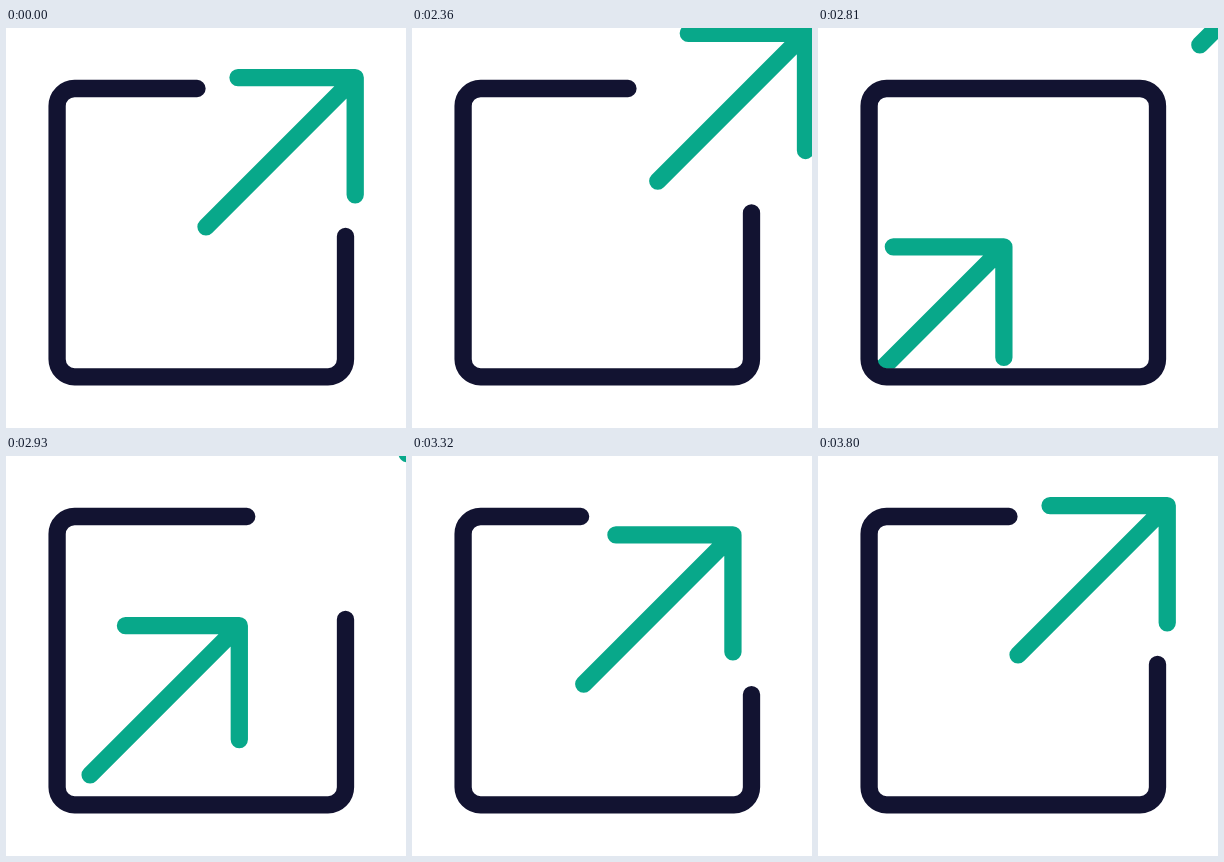
Write an HTML page with a canvas that moves like this. It is 400 by 400 pixels and loops after 3.83 s.

```html
<!DOCTYPE html>
<html lang="en">
<head>
<meta charset="utf-8">
<title>Outgoing arrow</title>
<style>
html, body { margin: 0; width: 100%; height: 100%; overflow: hidden; background: #fff; }
canvas { display: block; width: 400px; height: 400px; }
</style>
</head>
<body>
<canvas id="stage" width="400" height="400"></canvas>
<script>
const ctx = document.getElementById('stage').getContext('2d');
const LOOP = 3830;
const DARK = '#121331', GREEN = '#08a88a';
const BOX = { left: 51.1, top: 60.5, right: 339.5, bottom: 348.8, r: 17.5 };
const ARM = 117.2, SHAFT = 149.2;

const mix = (a, b, k) => a + (b - a) * k;
const phase = (t, from, to) => Math.min(1, Math.max(0, (t - from) / (to - from)));
const easeOut = (u, power) => 1 - (1 - u) ** power;

// Cubic easing with the same control points as CSS cubic-bezier().
function bezier(x1, y1, x2, y2) {
  const at = (a, b, s) => 3 * a * s * (1 - s) ** 2 + 3 * b * s * s * (1 - s) + s ** 3;
  return u => {
    if (u <= 0 || u >= 1) return u;
    let low = 0, high = 1;
    for (let i = 0; i < 24; i++) {
      const mid = (low + high) / 2;
      if (at(x1, x2, mid) < u) low = mid; else high = mid;
    }
    return at(y1, y2, low);
  };
}

const launch = bezier(0.3, 0.2, 0.55, 0.95);
const arrive = bezier(0.2, 0.4, 0.35, 1);
const settle = bezier(0.33, 0, 0.3, 1);

// Distance from the box corner to an open end: closes, springs open, settles.
function gap(t, closed, peak) {
  const rest = 148.4;
  if (t < 2830) return mix(rest, 0, phase(t, 2230, closed) ** 1.5);
  if (t < 3240) return mix(0, peak, easeOut(phase(t, 2830, 3240), 3));
  return mix(peak, rest, settle(phase(t, 3240, LOOP)));
}

function drawBox(t) {
  const { left, top, right, bottom, r } = BOX;
  const half = r * Math.PI / 4;
  const length = 2 * (right - left + bottom - top) - 8 * r + 8 * half;
  const skip = Math.max(0, half - r + gap(t, 2660, 172.5));
  const cut = Math.max(0, half - r + gap(t, 2680, 181));
  ctx.strokeStyle = DARK;
  ctx.setLineDash([length - skip - cut, length]);
  ctx.lineDashOffset = -skip;
  ctx.beginPath();
  ctx.arc(right - r, top + r, r, -Math.PI / 4, -Math.PI / 2, true);
  ctx.arc(left + r, top + r, r, -Math.PI / 2, Math.PI, true);
  ctx.arc(left + r, bottom - r, r, Math.PI, Math.PI / 2, true);
  ctx.arc(right - r, bottom - r, r, Math.PI / 2, 0, true);
  ctx.arc(right - r, top + r, r, 0, -Math.PI / 4, true);
  ctx.stroke();
  ctx.setLineDash([]);
}

function drawArrow(x, y, arm, shaft) {
  ctx.strokeStyle = GREEN;
  ctx.beginPath();
  ctx.moveTo(x - arm, y);
  ctx.lineTo(x, y);
  ctx.lineTo(x, y + arm);
  ctx.moveTo(x, y);
  ctx.lineTo(x - shaft, y + shaft);
  ctx.stroke();
}

// Pulls back with a slight squeeze, then shoots off the stage.
function drawOutgoing(t) {
  const pull = easeOut(phase(t, 2000, 2160), 2);
  const squeeze = pull * (1 - phase(t, 2160, 2400));
  const tail = mix(200 - 4.5 * pull, 412, launch(phase(t, 2160, 3080)));
  const shaft = SHAFT - 9 * squeeze;
  const x = tail + shaft;
  drawArrow(x, 398.8 - x, ARM, shaft);
}

// Rises out of the lower left corner, hidden behind the box edge at first.
function drawIncoming(t) {
  const left = 1 - arrive(phase(t, 2540, LOOP));
  const x = mix(349.3, 52.5, left);
  const y = 398.8 - x + 10.8 * left;
  ctx.save();
  ctx.beginPath();
  ctx.rect(BOX.left + 8, 0, 400, BOX.bottom - 8);
  ctx.clip();
  drawArrow(x, y, ARM - 22 * left * left, SHAFT);
  ctx.restore();
}

function draw(t) {
  ctx.fillStyle = '#fff';
  ctx.fillRect(0, 0, 400, 400);
  ctx.lineWidth = 17.3;
  ctx.lineCap = ctx.lineJoin = 'round';
  if (t < 3080) drawOutgoing(t);
  if (t > 2540) drawIncoming(t);
  drawBox(t);
}

const start = performance.now();
function tick() {
  draw((performance.now() - start) % LOOP);
  requestAnimationFrame(tick);
}
tick();
</script>
</body>
</html>
```
